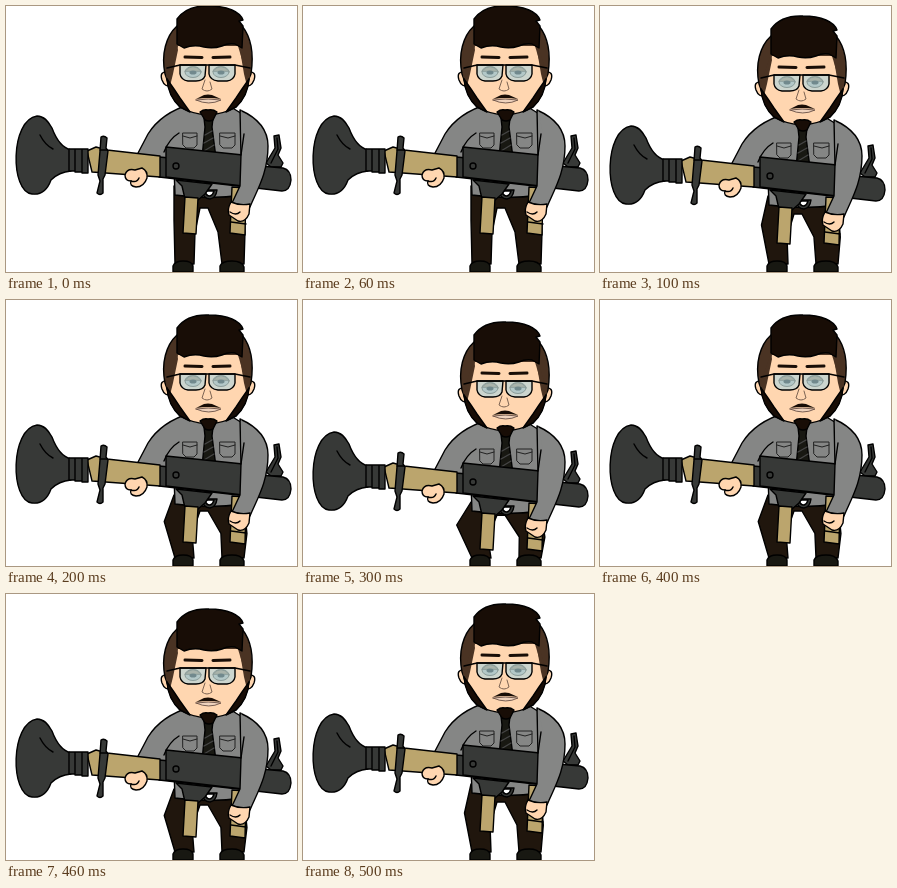
These frames come from a looping animation (291 by 266 pixels, 0.6 s). An HTML page:

```html
<!DOCTYPE html>
<html>
<head>
<meta charset="utf-8">
<style>
html, body { margin: 0; width: 100%; height: 100%; overflow: hidden; background: #fff; }
svg { display: block; width: 100%; height: 100%; }
.ink { stroke: #000; stroke-width: 1.4; stroke-linejoin: round; stroke-linecap: round; }
.line { fill: none; }
.skin { fill: #ffd6b0; }
.hair { fill: #180d06; }
.side { fill: #4a3323; }
.shirt { fill: #858685; }
.metal { fill: #373937; }
.wood { fill: #bba56d; }
.pants { fill: #20160d; }
.dark { fill: #181812; }
</style>
</head>
<body>
<svg viewBox="0 0 291 266">
  <g class="ink">
    <path id="legs" class="pants"/>
    <g class="dark">
      <path d="M167 266 V260 Q169 255 177 255 Q186 255 187 260 V266 Z"/>
      <path d="M214 266 V260 Q216 255 226 255 Q236 255 238 261 V266 Z"/>
    </g>
  </g>

  <g id="upper" class="ink">
    <path class="shirt" d="M185 98 C168 103 152 112 142 128 L131 149 L138 166 L168 162 L169 189 Q202 194 238 189 L246 114 L220 98 Z"/>
    <path class="line" d="M173 127 Q163 133 158 146"/>
    <path class="dark" d="M198 112 H207 L206 121 L210 152 H196 L199 121 Z"/>
    <path class="line" style="stroke:#454545" d="M199 129 L206 125 M198 137 L207 132 M198 145 L208 139"/>
    <g class="shirt" style="stroke:#222;stroke-width:1">
      <path d="M177 127 H191 V139 L188 142 H180 L177 139 Z M214 127 H229 V139 L226 142 H217 L214 139 Z"/>
      <path class="line" d="M177 130 L184 132 L191 130 M214 130 L222 132 L229 130"/>
    </g>

    <g class="metal">
      <path d="M265 161 L260 157 L269 142 L268 130 L273 129 L275 142 L272 149 L277 157 L275 161 Z"/>
      <path class="line" d="M271 132 L272 143 L265 157"/>
      <path d="M153 151 L277 162 Q285 164 285 174 Q284 185 276 185 L153 171 Z"/>
      <path d="M196 184 Q197 193 204 193 Q210 192 211 184 Z"/>
      <path style="fill:#fff" d="M199 185 Q200 190 204 190 Q207 189 208 185 Z"/>
      <path d="M170 174 L206 178 L199 188 L192 194 L179 193 L176 180 Z"/>
      <path d="M160 141 L237 149 V180 L160 171 Z"/>
      <circle cx="170" cy="160" r="3"/>
    </g>
    <g class="wood">
      <path d="M179 191 L192 192 L190 228 L177 227 Z"/>
      <path d="M226 181 L240 182 L239 229 L224 227 Z"/>
      <path d="M225 216 L240 218" class="line"/>
      <path d="M81 145 L90 141 L101 144 L154 150 V171 L86 166 Z"/>
    </g>
    <g class="metal">
      <path d="M31 110 C38 110 42 115 46 122 Q53 141 65 144 V165 Q53 166 45 174 C41 185 34 189 26 188 C4 186 4 114 31 110 Z"/>
      <path class="line" d="M34 129 Q39 139 47 143"/>
      <path d="M63 143 H69 V165 H63 Z M69 143 H76 V166 H69 Z M76 143 H82 V167 H76 Z"/>
      <path d="M95 131 Q98 129 101 132 L100 142 L102 145 L99 169 L97 173 L97 187 Q94 190 91 187 L94 175 L92 169 L94 145 Z"/>
      <path class="line" d="M94 144 H101"/>
    </g>

    <path class="skin" d="M119 169 Q121 162 129 164 L136 162 Q142 165 141 172 Q138 181 130 181 Q123 180 125 175 Q119 175 119 169 Z"/>
    <path class="line" d="M125 175 Q131 177 133 172"/>
    <path class="shirt" d="M234 104 C252 112 262 124 262 140 C262 167 251 184 244 201 L226 197 L234 180 L235 149 Z"/>
    <path d="M235 103 L240 127 L236 148" style="stroke:none" class="shirt"/>
    <path class="line" d="M235 149 L238 128"/>
    <path class="skin" d="M225 196 Q234 200 244 198 L243 208 Q239 217 232 215 L223 209 Q221 203 225 196 Z"/>
    <path class="line" d="M224 206 Q230 210 234 206"/>

    <path class="skin" d="M162 66 Q153 65 156 74 Q159 82 165 79 Z M242 66 Q251 65 248 74 Q245 82 239 79 Z"/>
    <path class="side" d="M159 68 C155 48 160 30 171 20 H236 C245 31 248 48 245 68 L239 82 H164 Z"/>
    <path class="skin" d="M162 74 Q163 90 174 101 Q186 108 202 109 Q218 108 230 101 Q241 90 242 74 L232 40 H172 Z" style="stroke:none"/>
    <path class="side" style="stroke:none" d="M160 70 L171 38 L172 44 L167 68 L164 80 Z M244 70 L235 38 L234 44 L238 68 L241 80 Z"/>
    <path class="line" d="M161 73 Q163 90 174 101 Q186 108 202 109 Q218 108 230 101 Q241 90 243 73"/>
    <path class="hair" d="M161 73 L168 83 L174 92 L184 106 L174 101 Q162 90 161 73 Z M243 73 L236 83 L230 92 L220 106 L230 101 Q242 90 243 73 Z"/>
    <path class="hair" d="M194 106 Q198 103 202 104 Q207 103 211 106 L207 114 Q203 116 199 114 Z"/>
    <path class="hair" d="M171 38 V13 Q181 -1 203 0 C222 0 234 6 237 14 L233 15 L237 20 L236 42 L229 38 Q222 37 216 40 Q207 43 198 41 Q188 38 178 42 Z"/>
    <path class="line" style="stroke:#180d06;stroke-width:3" d="M179 51 L196 51.5 M207 51.5 L224 51"/>
    <path style="fill:#ccd5ce" d="M174 59 H200 L199 70 Q197 75 190 75 H182 Q175 74 174 68 Z M203 59 H229 V68 Q228 74 221 75 H212 Q204 74 203 68 Z"/>
    <g style="fill:#b3c8c8;stroke:#8b9c99;stroke-width:1">
      <ellipse cx="187" cy="66" rx="8" ry="5.5"/>
      <ellipse cx="215" cy="66" rx="8" ry="5.5"/>
      <path style="fill:#a9b3ab" d="M179 65 Q187 56 195 65 Z M207 65 Q215 56 223 65 Z"/>
    </g>
    <g fill="#71898d" stroke="none"><ellipse cx="187" cy="66.5" rx="3.5" ry="2"/><ellipse cx="215" cy="66.5" rx="3.5" ry="2"/></g>
    <path class="line" d="M161 62 L174 59 H229 L244 62"/>
    <path class="line" style="stroke:#7d6453;stroke-width:1" d="M199 74 L196 83 Q201 87 206 83 L204 76"/>
    <path class="hair" style="stroke:none" d="M190 93 L198 89 Q202 88 206 89 L215 93 Q202 91 190 93 Z"/>
    <path style="fill:#f0d3bd;stroke:#574039;stroke-width:.8" d="M190 94 Q202 92 215 94 Q203 100 190 94 Z"/>
  </g>
</svg>
<script>
const drops = [0, 10, 15, 22];
const [legs, upper] = ['legs', 'upper'].map(id => document.getElementById(id));

// The knees bend outward as the hips sink toward the fixed feet.
function legPath(drop) {
  const hip = 180 + drop, crotch = 202 + drop * .6;
  const knee = 214 + drop / 2, bend = drop * .65;
  return `M168 ${hip} H237 L${239 + bend * .2} ${knee + 12} L238 258 H216
    L${212 + bend * .3} ${knee + 12} L202 ${crotch} H194
    L${189 - bend * .3} ${knee + 12} L188 258 H169 L${168 - bend} ${knee} Z`;
}

function draw() {
  const step = Math.floor(performance.now() / 100) % 6;
  const drop = drops[Math.min(step, 6 - step)];
  upper.setAttribute('transform', `translate(0 ${drop})`);
  legs.setAttribute('d', legPath(drop));
  requestAnimationFrame(draw);
}
draw();
</script>
</body>
</html>
```
